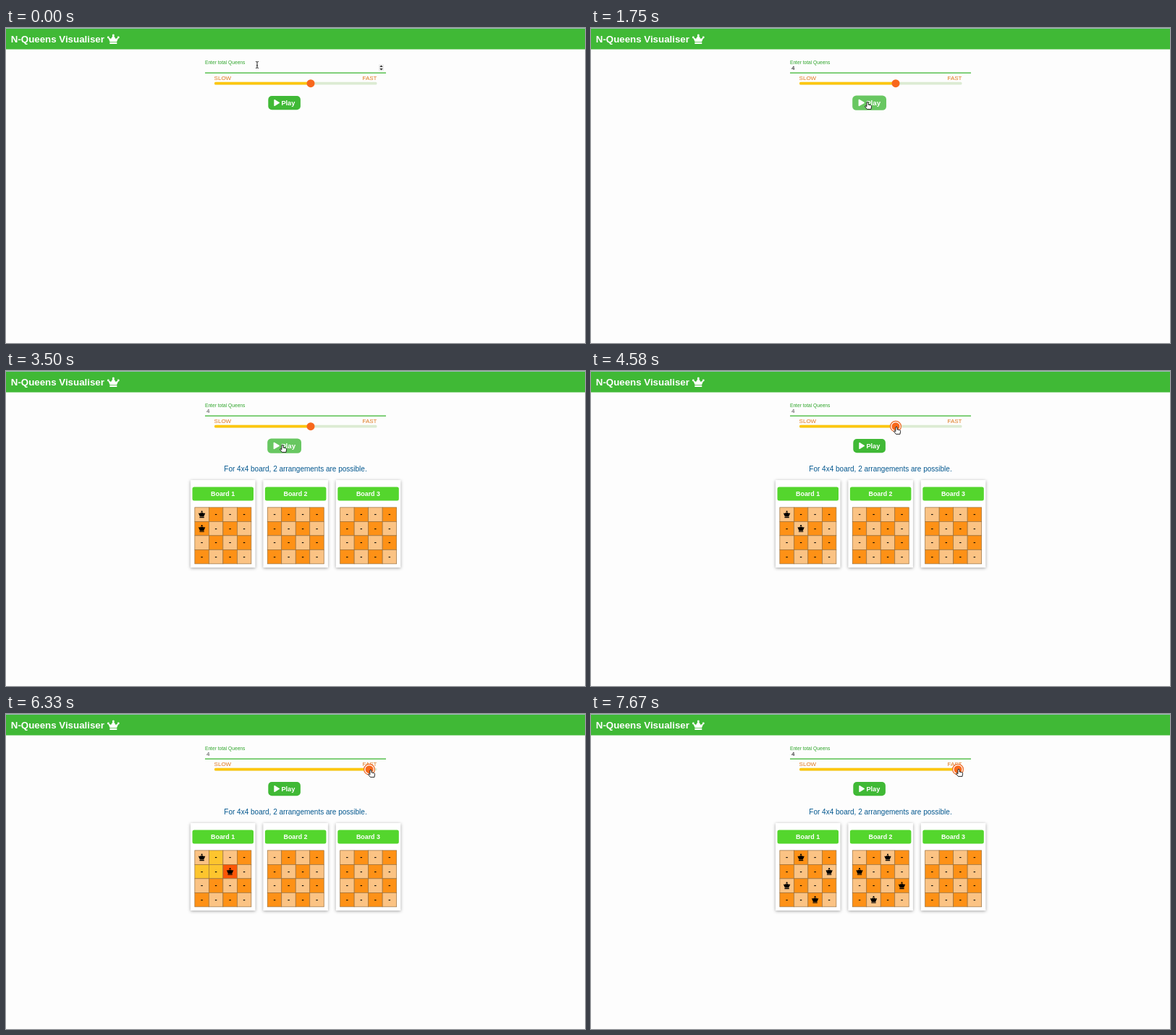
Write an HTML page that moves like this. It is 800x436 px and loops after 8000 ms.

```html
<!DOCTYPE html>
<html lang="en">
<head>
<meta charset="utf-8">
<title>N-Queens Visualiser</title>
<style>
html, body { margin: 0; width: 100%; height: 100%; overflow: hidden; background: #fdfdfd }
svg { display: block; width: 800px; height: 436px; font-family: "Liberation Sans", Arial, sans-serif }
.bold { font-weight: bold }
.mid { text-anchor: middle }
.card { fill: #fff; filter: drop-shadow(0 1.5px 2px rgba(0, 0, 0, .36)) }
.cell { stroke: #98703f; stroke-width: .7 }
.pointer path { fill: #fff; stroke: #111; stroke-width: .9; stroke-linejoin: round }
</style>
</head>
<body>
<svg viewBox="0 0 800 436">
  <defs>
    <g id="queen">
      <circle cy="-3.9" r="1.1"/>
      <path d="M-4.6-1.6L-2.7 2.8H2.7L4.6-1.6 3.6-2.2Q2.6-.8 1.5-2.6H.7Q0-1.4-.7-2.6H-1.5Q-2.6-.8-3.6-2.2Z"/>
      <rect x="-3.2" y="3.3" width="6.4" height="1.4" rx=".4"/>
    </g>
  </defs>
  <rect width="800" height="29.5" fill="#40b936"/>
  <rect width="800" height="1" fill="#9db9bd"/>
  <g fill="#fff">
    <text class="bold" x="6.8" y="20" font-size="13.3">N-Queens Visualiser</text>
    <path d="M141 12.8L143.6 19.2H153L155.6 12.8 151.6 15 148.3 9.8 145 15Z"/>
    <circle cx="148.3" cy="9.9" r="1.5"/>
    <circle cx="141.3" cy="13" r="1.4"/>
    <circle cx="155.3" cy="13" r="1.4"/>
    <rect x="143.2" y="19.9" width="10.2" height="2" rx=".6"/>
  </g>

  <text x="275" y="49.5" font-size="6.65" fill="#2fa52b">Enter total Queens</text>
  <text id="count" x="277" y="57.6" font-size="8">4</text>
  <rect x="275" y="61.5" width="250" height="1.3" fill="#40b936"/>
  <g id="spin">
    <rect x="515" y="50.5" width="7" height="9" fill="#ececec"/>
    <path d="M516.3 54L518.5 51.4 520.7 54ZM516.3 56L518.5 58.6 520.7 56Z" fill="#333"/>
  </g>

  <g font-size="8" fill="#de781c">
    <text x="287.6" y="72">SLOW</text>
    <text x="512.5" y="72" text-anchor="end">FAST</text>
  </g>
  <rect x="288" y="74.8" width="224.5" height="3.7" rx="1.5" fill="#dcebd3"/>
  <rect id="fill" x="288" y="74.8" height="3.7" rx="1.5" fill="#fdc60f"/>
  <g id="thumb">
    <circle id="ring" r="7.4" fill="#fff" stroke="#ee6a25" stroke-width="1.2"/>
    <circle r="5.5" fill="#f8681c"/>
  </g>

  <g id="play">
    <rect id="face" x="-22.3" y="-9.6" width="44.6" height="19.2" rx="5" fill="#40b936"/>
    <path d="M-13.6-3.9L-7.2-.1-13.6 3.7Z" fill="#fff" stroke="#fff" stroke-width="1.4" stroke-linejoin="round"/>
    <text class="bold" x="-4.2" y="3.1" font-size="9.2" fill="#fff">Play</text>
  </g>

  <g id="result">
    <text class="mid" x="400" y="139" font-size="10" fill="#04588f">For 4x4 board, 2 arrangements are possible.</text>
    <g id="boards"></g>
  </g>

  <g class="pointer">
    <path id="beam" d="M-2-4.5Q0-4.5 0-3.5Q0-4.5 2-4.5M0-3.5V3.5M-2 4.5Q0 4.5 0 3.5Q0 4.5 2 4.5M-1 .9H1" style="fill:none"/>
    <path id="hand" d="M-1.1 1Q0-.6 1.1 1V4L4.6 4.8Q5.8 5.2 5.6 6.4L5 10.4H-.6L-3.4 6.8Q-3.4 5.4-2.2 5.9L-1.1 6.8Z"/>
    <path id="arrow" d="M0 0V9.6L2.2 7.6 3.8 11 5.4 10.3 3.9 7H6.8Z" style="fill:#111;stroke:#fff"/>
  </g>
</svg>
<script>
const LOOP = 8000, START = 1830, END = 7660, N = 4, SIZE = 19.5;
const YELLOW = "#fdc52e", RED = "#fb5607";
const $ = id => document.getElementById(id);
const show = (el, on) => el.setAttribute("visibility", on ? "inherit" : "hidden");

// Backtracking search, recording the boards at every pause
const queens = Array(3 * N * N).fill(false), marks = Array(3 * N * N).fill("");
const steps = [], cols = [];
let board = 0;
const at = (r, c) => (board * N + r) * N + c;
const pause = () => steps.push({ queens: [...queens], marks: [...marks] });
const clear = () => marks.fill("");

function valid(r, c) {
  queens[at(r, c)] = true;
  pause();
  for (const d of [0, -1, 1]) {
    for (let i = 1; i <= r && c + d * i >= 0 && c + d * i < N; i++) {
      const k = at(r - i, c + d * i);
      if (queens[k]) {
        marks[k] = RED;
        queens[at(r, c)] = false;
        return false;
      }
      marks[k] = YELLOW;
      pause();
    }
  }
  return true;
}

function solve(r) {
  if (r === N) {
    board++;
    cols.forEach((c, row) => queens[at(row, c)] = true);
    return;
  }
  for (let c = 0; c < N; c++) {
    pause();
    clear();
    if (!valid(r, c)) continue;
    clear();
    cols[r] = c;
    solve(r + 1);
    pause();
    clear();
    queens[at(r, c)] = false;
  }
}
solve(0);
clear();
pause();

// Slow steps first; after the slider is raised they run evenly
const slow = [START, 2200, 2600, 3000, 3560, 4090, 4630, 4960, 5250,
  5450, 5630, 5790, 5900, 6000, 6080, 6170, 6250, 6310];
const last = slow.length - 1;
function stepAt(t) {
  if (t < slow[last]) return Math.max(0, slow.findIndex(s => s > t) - 1);
  const p = Math.min(1, (t - slow[last]) / (END - slow[last]));
  return last + Math.floor(p * (steps.length - 1 - last));
}

const cells = [];
let html = "";
for (let b = 0; b < 3; b++) {
  const x = 255 + b * 100.4;
  html += `<rect class="card" x="${x}" y="151" width="89.5" height="121"/>
    <rect x="${x + 2.5}" y="160.5" width="84.5" height="19" rx="2.5" fill="#54d62d"/>
    <text class="bold mid" x="${x + 44.6}" y="173" font-size="8.9" fill="#fff">Board ${b + 1}</text>`;
  for (let r = 0; r < N; r++) for (let c = 0; c < N; c++) {
    const cx = x + 15.6 + c * SIZE, cy = 198.6 + r * SIZE;
    html += `<g class="slot" transform="translate(${cx} ${cy})">
      <rect class="cell" x="${-SIZE / 2}" y="${-SIZE / 2}" width="${SIZE}" height="${SIZE}"/>
      <text class="bold mid" y="2.4" font-size="9.5">-</text><use href="#queen"/></g>`;
  }
}
$("boards").innerHTML = html;
document.querySelectorAll(".slot").forEach((g, i) => {
  const odd = (Math.floor(i / N) + i) % 2;
  cells.push({ parts: g.children, base: odd ? "#fe9116" : "#fbc384" });
});

// Eased interpolation between [time, ...values] keys
function track(keys, t) {
  const i = keys.findIndex(k => k[0] > t);
  if (i === 0) return keys[0].slice(1);
  if (i < 0) return keys[keys.length - 1].slice(1);
  const a = keys[i - 1], b = keys[i], p = (t - a[0]) / (b[0] - a[0]);
  const e = p * p * (3 - 2 * p);
  return a.slice(1).map((v, j) => v + (b[j + 1] - v) * e);
}
const pointerKeys = [[1000, 347, 51], [1550, 382, 102], [3650, 382, 102], [4250, 422, 77],
  [4700, 422, 77], [5420, 464, 79], [6330, 504, 77], [6800, 508, 76]];
const sliderKeys = [[4700, 421], [5420, 464], [6330, 502], [6800, 507]];

function draw(t) {
  const [px, py] = track(pointerKeys, t), [sx] = track(sliderKeys, t);
  const running = t >= START && t < END;

  show($("count"), t >= 500);
  $("count").setAttribute("fill", running ? "#4a4a4a" : "#000");

  const inInput = py < 62;
  const onPlay = Math.abs(px - 384.5) < 23 && Math.abs(py - 103.5) < 10;
  const onThumb = Math.hypot(px - sx, py - 76.7) < 8;
  show($("spin"), inInput);
  show($("beam"), inInput);
  show($("hand"), onPlay || onThumb);
  show($("arrow"), !inInput && !onPlay && !onThumb);
  document.querySelector(".pointer").setAttribute("transform", `translate(${px} ${py})`);

  $("fill").setAttribute("width", sx - 288);
  $("thumb").setAttribute("transform", `translate(${sx} 76.7)`);
  show($("ring"), onThumb);
  $("play").setAttribute("transform", `translate(384.6 103.6) scale(${onPlay ? 1.05 : 1})`);
  $("face").setAttribute("fill", onPlay ? "#68c761" : "#40b936");

  show($("result"), t >= START);
  const step = steps[stepAt(t)];
  cells.forEach(({ parts: [box, dash, queen], base }, i) => {
    box.setAttribute("fill", step.marks[i] || base);
    show(dash, !step.queens[i]);
    show(queen, step.queens[i]);
  });
}

function frame() {
  draw(performance.now() % LOOP);
  requestAnimationFrame(frame);
}
frame();
</script>
</body>
</html>
```
